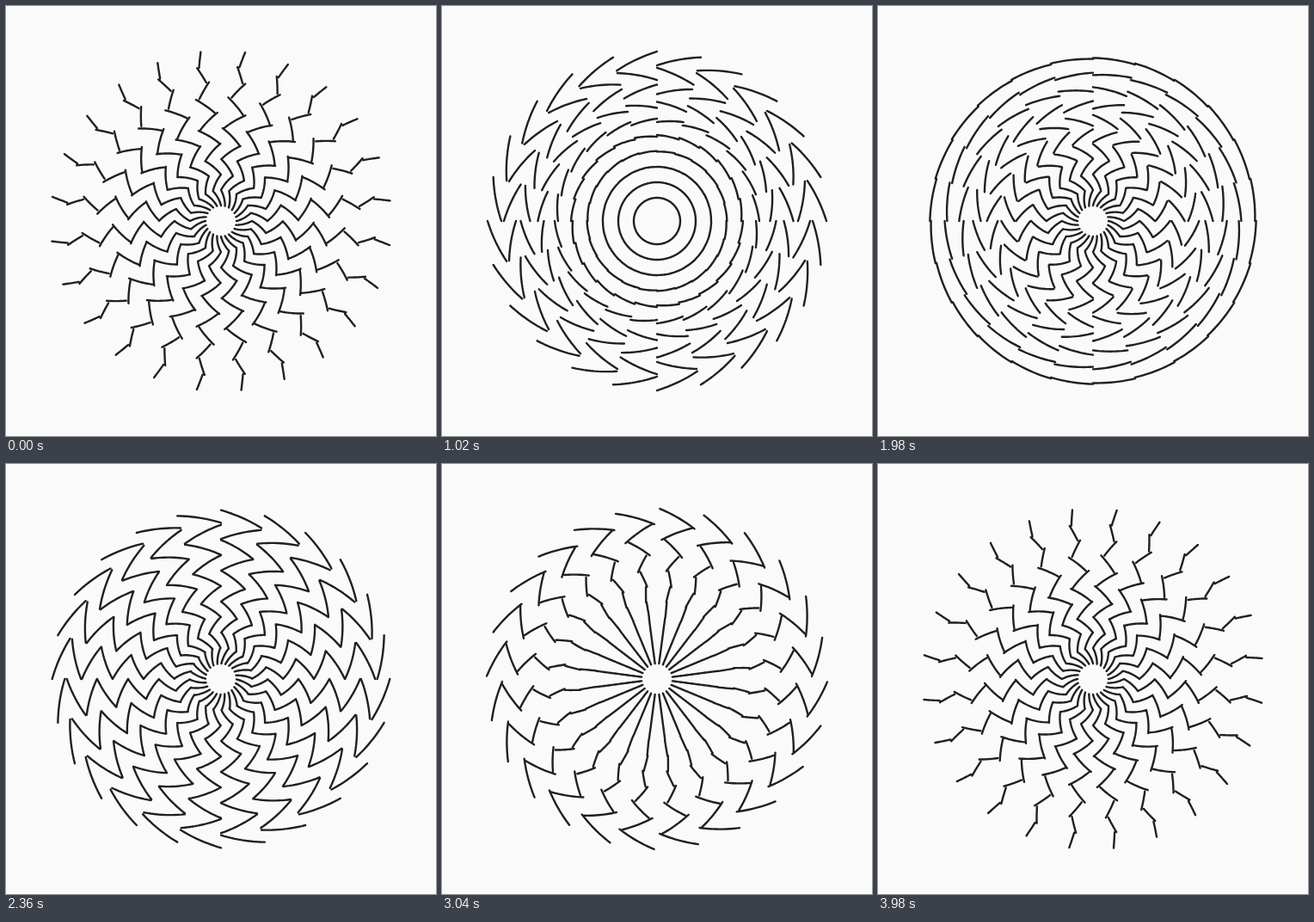
These frames come from a looping animation (500x500 px, 4000 ms). An HTML page with a canvas:

```html
<!DOCTYPE html>
<html lang="en">
<head>
<meta charset="utf-8">
<title>Zigzag rings</title>
<style>
  html, body { margin: 0; width: 100%; height: 100%; overflow: hidden; background: #fafafa; }
  canvas { display: block; width: 500px; height: 500px; }
</style>
</head>
<body>
<canvas id="stage" width="500" height="500"></canvas>
<script>
const ctx = document.getElementById('stage').getContext('2d');
const LOOP = 4000, STAGE = 1000, DELAY = 80;
const RINGS = 10, SPOKES = 24, GAP = 18, STEPS = 12;
const STEP_ANGLE = 2 * Math.PI / SPOKES;

const ease = p => p < 0.5 ? 4 * p ** 3 : 1 - 4 * (1 - p) ** 3;

// Angular width and radial height of a segment, each from -1 to 1:
// zigzag, flat circle, mirrored zigzag, radial spokes, zigzag again.
function pose(time) {
  const t = (time + LOOP) % LOOP;
  const stage = Math.floor(t / STAGE);
  const q = stage + ease(t / STAGE - stage);
  return q < 2 ? { width: 1, height: 1 - q } : { width: 3 - q, height: -1 };
}

function addRing(i, time) {
  const { width, height } = pose(time - i * DELAY);
  const radius = GAP * (i + 1.5);
  const side = i % 2 ? 1 : -1;
  for (let k = 0; k < SPOKES; k++) {
    const middle = (k + 0.5) * STEP_ANGLE;
    for (let n = 0; n <= STEPS; n++) {
      const u = n / STEPS - 0.5;
      const a = middle + u * width * STEP_ANGLE;
      const r = radius + u * height * side * GAP;
      const x = r * Math.cos(a), y = r * Math.sin(a);
      if (n) ctx.lineTo(x, y);
      else ctx.moveTo(x, y);
    }
  }
}

function draw(now) {
  const time = now % LOOP;
  ctx.setTransform(1, 0, 0, 1, 0, 0);
  ctx.fillStyle = '#fafafa';
  ctx.fillRect(0, 0, 500, 500);
  ctx.translate(250, 250);
  ctx.strokeStyle = '#202020';
  ctx.lineWidth = 2.4;
  ctx.lineCap = ctx.lineJoin = 'round';
  ctx.beginPath();
  for (let i = 0; i < RINGS; i++) addRing(i, time);
  ctx.stroke();
}

let start;
function tick(now) {
  start ??= now;
  draw(now - start);
  requestAnimationFrame(tick);
}
draw(0);
requestAnimationFrame(tick);
</script>
</body>
</html>
```
